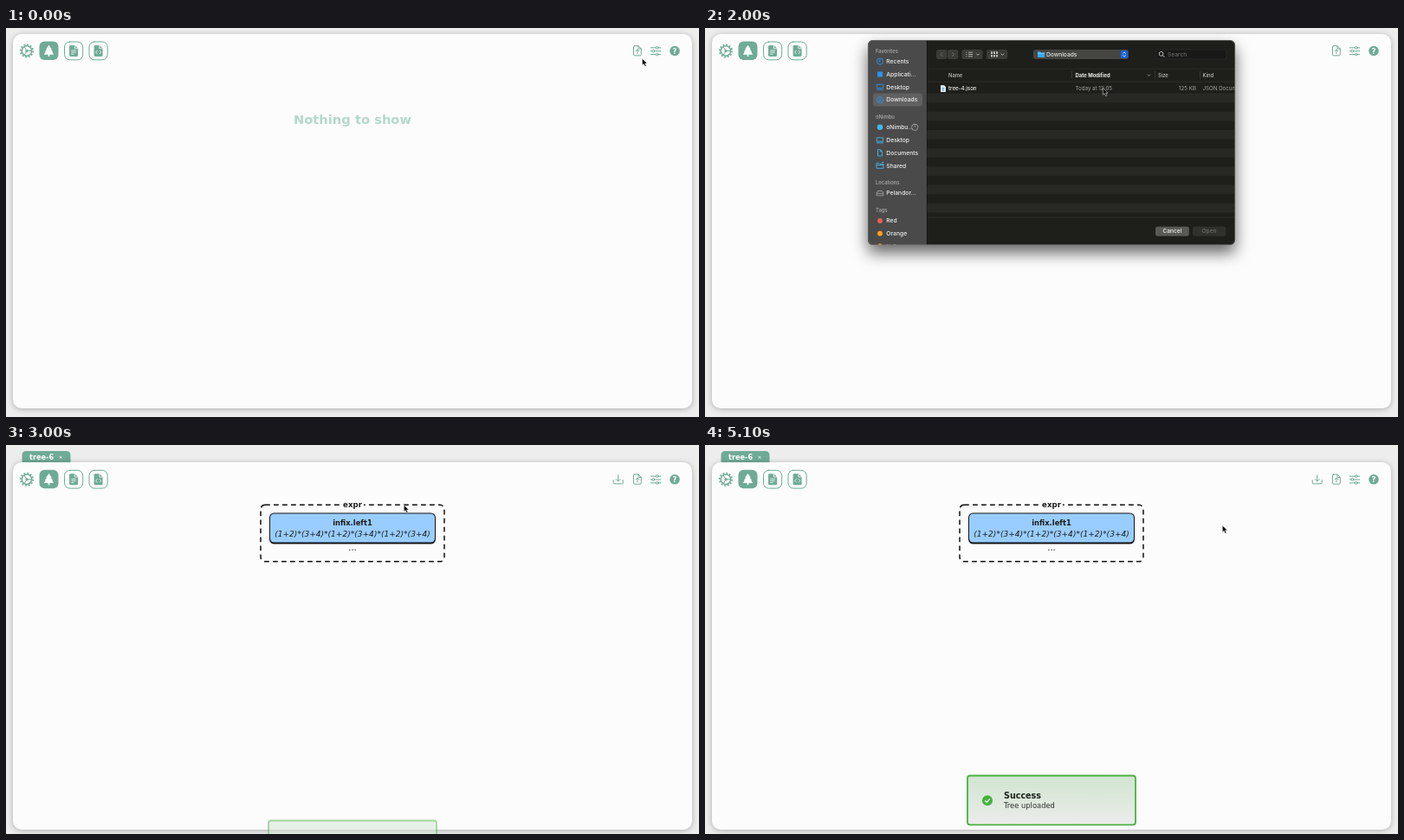
An HTML page that plays this animation: 800 by 450 pixels, repeating every 5200 ms.

```html
<!DOCTYPE html>
<html lang="en">
<head>
<meta charset="utf-8">
<title>Tree upload</title>
<style>
  html, body { margin: 0; width: 100%; height: 100%; overflow: hidden; background: #ededed; }
  svg { display: block; width: 100%; height: 100%; }
  text { white-space: pre; }
  .app { font-family: "DejaVu Sans", Verdana, sans-serif; }
  .mac { font-family: Inter, "Open Sans", sans-serif; }
  .b { font-weight: 700; }
  .line { fill: none; stroke: #6fab97; stroke-width: 1; stroke-linecap: round; stroke-linejoin: round; }
  .teal { fill: #6fab97; }
  #card { filter: drop-shadow(0 1px 3px rgba(0,0,0,.28)); }
  #dialog { filter: drop-shadow(0 9px 9px rgba(0,0,0,.6)); }
</style>
</head>
<body>
<svg viewBox="0 0 800 450">
  <defs>
    <clipPath id="panel"><rect x="188" y="14" width="424" height="237" rx="6"/></clipPath>
    <linearGradient id="mint" x1="0" y1="0" x2="0" y2="1">
      <stop offset="0" stop-color="#d0e5cf"/><stop offset="1" stop-color="#ececeb"/>
    </linearGradient>
  </defs>
  <rect width="800" height="450" fill="#ededed"/>

  <g class="app">
    <g id="tab">
      <path class="teal" d="M18.500 20V12q0-5 5-5h46q5 0 5 5v8z"/>
      <text class="b" x="27" y="17" font-size="8.2" fill="#fff">tree-6</text>
      <path d="M61.500 12.700l3.200 3.200m0-3.200l-3.200 3.200" stroke="#fff" stroke-width=".7"/>
    </g>
    <rect id="card" x="8" width="784" rx="10" fill="#fcfcfc"/>
    <text id="empty" class="b" x="400" y="111.300" font-size="14.700" text-anchor="middle" fill="#b3d8cc">Nothing to show</text>

    <g id="tools">
      <g class="line">
        <circle cx="24" cy="26.500" r="5.700" stroke-width="1.500"/>
        <circle id="teeth" cx="24" cy="26.500" r="7.200" stroke-width="1.700" stroke-linecap="butt"/>
        <path d="M24 26.500h5.500M24 26.500l-2.800-4.800M24 26.500l-2.800 4.800"/>
        <circle cx="24" cy="26.500" r="1.300"/>
      </g>
      <rect class="teal" x="38.500" y="15.500" width="22" height="21.500" rx="6"/>
      <path d="M49.500 19.800l3.300 4.600h-1l2.400 3.400h-1l2 3h-4.900v2.200h-1.600v-2.200h-4.900l2-3h-1l2.400-3.400h-1z" fill="#fff"/>
      <g class="line">
        <rect x="67.500" y="16" width="21.200" height="20.800" rx="6"/>
        <rect x="96" y="16" width="21.200" height="20.800" rx="6"/>
      </g>
      <g class="teal">
        <path id="doc" d="M74.500 19.900h4.900l3.700 3.700v8q0 1.400-1.400 1.400h-7.200q-1.400 0-1.400-1.400v-10.300q0-1.400 1.400-1.400z"/>
        <use href="#doc" x="28.500"/>
      </g>
      <g fill="none" stroke="#fff" stroke-width=".8">
        <path d="M79.400 20v3.700h3.600M75.300 26h5.500M75.300 28.100h5.500M75.300 30.200h3.200"/>
        <path d="M107.900 20v3.700h3.600M105.500 26l-1.900 2 1.900 2M107.900 26l1.900 2-1.900 2"/>
      </g>
      <g class="line">
        <path d="M725.700 20.700h4.300l3.300 3.300v6.700q0 1.200-1.200 1.200h-6.400q-1.200 0-1.200-1.200v-8.800q0-1.200 1.200-1.200zM730 20.900v3.200h3.200M728.900 29.300v-4.400m-1.700 1.700l1.700-1.700 1.700 1.700"/>
        <path d="M744.300 22.800h6m2.800 0h2.600M744.300 26.700h1.600m2.800 0h7M744.300 30.600h6m2.800 0h2.600"/>
        <circle cx="751.700" cy="22.800" r="1.350"/><circle cx="747.300" cy="26.700" r="1.350"/><circle cx="751.700" cy="30.600" r="1.350"/>
        <path id="save" d="M701.200 27.300v3.200q0 1 1 1h9q1 0 1-1v-3.200M706.700 21.500v7.200m-2.500-2.500l2.500 2.500 2.500-2.500"/>
      </g>
      <circle class="teal" cx="772" cy="26.500" r="5.800"/>
      <text class="b" x="772" y="29.700" font-size="8.500" text-anchor="middle" fill="#fff">?</text>
    </g>

    <g id="tree" text-anchor="middle" fill="#1d1d1d">
      <rect x="294" y="69.300" width="212" height="65.500" rx="5" fill="none" stroke="#111" stroke-width="1.500" stroke-dasharray="5.800 4.200"/>
      <rect x="387" y="64" width="26" height="10" fill="#fcfcfc"/>
      <text class="b" x="400" y="72" font-size="8.600">expr</text>
      <rect x="304" y="78.500" width="192" height="36" rx="5.500" fill="#111"/>
      <rect x="305" y="79.500" width="190" height="33" rx="4.500" fill="#99cdff"/>
      <text class="b" x="400" y="93" font-size="8.400">infix.left1</text>
      <text x="400" y="105.800" font-size="9.050" font-style="italic">(1+2)*(3+4)*(1+2)*(3+4)*(1+2)*(3+4)</text>
      <text x="400" y="122" font-size="10">...</text>
    </g>

    <g id="toast">
      <rect x="303" y="382.500" width="194" height="56.800" rx="3" fill="url(#mint)" stroke="#4bb143" stroke-width="1.800"/>
      <circle cx="326" cy="411.200" r="6" fill="#45b13e"/>
      <path d="M323.200 411.300l2 2 3.700-3.900" fill="none" stroke="#fff" stroke-width="1.200"/>
      <text class="b" x="345" y="409" font-size="9.600" fill="#1d2420">Success</text>
      <text x="345" y="420" font-size="8.350" fill="#2b302c">Tree uploaded</text>
    </g>
  </g>

  <g id="dialog" class="mac">
    <g clip-path="url(#panel)">
      <rect x="188" y="14" width="424" height="237" fill="#1e1e1b"/>
      <rect x="188" y="14" width="68" height="237" fill="#4a4a4a"/>
      <path d="M256.300 14v237" stroke="#111" stroke-width=".6"/>
      <g id="stripes" fill="#282825"></g>
      <path d="M257 47.300h355M257 62.200h355M257 219h355" stroke="#343431" stroke-width=".7"/>
      <path d="M423.500 50v9M519.500 50v9M571.500 50v9" stroke="#42423f" stroke-width=".7"/>
      <rect id="pick" x="256.500" y="65" width="356" height="10.600" fill="#0a50d2"/>

      <g fill="#3b3b38">
        <rect x="267" y="25" width="12.300" height="11" rx="2.500"/>
        <rect x="280" y="25" width="12.300" height="11" rx="2.500"/>
        <rect x="296.300" y="25" width="24.200" height="11" rx="2.500"/>
        <rect x="325" y="25" width="24.200" height="11" rx="2.500"/>
        <rect x="379" y="25" width="110" height="11" rx="2.700" fill="#454542"/>
      </g>
      <g fill="none" stroke="#777773" stroke-width=".9">
        <path d="M274.200 28.200l-2.200 2.300 2.200 2.300M285.200 28.200l2.200 2.300-2.200 2.300"/>
        <g stroke="#bcbcb9">
          <path d="M304 28.200h5M304 30.500h5M304 32.800h5M301.300 28.200h1M301.300 30.500h1M301.300 32.800h1"/>
          <path d="M313.300 29.700l1.700 1.700 1.700-1.700M341.700 29.700l1.700 1.700 1.700-1.700"/>
          <path d="M330 28.600h8M330 32.200h8" stroke-width="2.600" stroke-dasharray="2 1"/>
          <path d="M510.800 53.700l1.700 1.700 1.700-1.700" stroke-width=".7"/>
        </g>
      </g>
      <path d="M384 27.300h3l1 1h4.200v5.700h-8.200z" fill="#38aaf0"/>
      <path d="M384 29.500h8.200" stroke="#82d2fb" stroke-width=".7"/>
      <rect x="479.600" y="26" width="8.600" height="9" rx="2" fill="#1762dc"/>
      <path d="M482.200 29.600l1.700-1.800 1.700 1.800M482.200 31.400l1.700 1.800 1.700-1.800" fill="none" stroke="#fff" stroke-width=".8"/>
      <rect x="520.300" y="25" width="81.500" height="11" rx="2.500" fill="#191917" stroke="#32322f" stroke-width=".6"/>
      <g fill="none" stroke="#d0d0cd" stroke-width=".9"><circle cx="526.600" cy="29.900" r="2.400"/><path d="M528.400 31.700l2.100 2.200"/></g>

      <path d="M272 66.200h4l1.900 1.900v6h-5.900z" fill="#f1f5f8"/>
      <path d="M273.300 69.200h3M273.300 70.700h3M273.300 72.200h3" stroke="#3d8ce0" stroke-width=".8"/>
      <rect x="520" y="229.700" width="38.800" height="11" rx="2.500" fill="#595956"/>
      <rect id="openBtn" x="563" y="229.700" width="38.200" height="11" rx="2.500"/>
      <rect x="194" y="75.500" width="57" height="15" rx="3" fill="#616161"/>
      <g id="labels"></g>

      <g fill="none" stroke="#2d93ee" stroke-width=".9">
        <circle cx="202" cy="38.600" r="3.600"/><path d="M202 36.300v2.500h-1.800"/>
        <rect x="199" y="50.500" width="6" height="6" fill="#2d93ee" stroke="none"/>
        <path d="M198.300 65.300h7.400v4.300h-7.400zM198 71.300h8"/>
        <circle cx="202" cy="83.200" r="3.600"/><path d="M202 81v4m-1.600-1.500l1.600 1.600 1.600-1.600"/>
        <g stroke="#45b7ec">
          <circle cx="202" cy="114.800" r="3.300" fill="#45b7ec" stroke="none"/>
          <path d="M198.300 126.900h7.400v4.300h-7.400zM198 132.900h8"/>
          <path d="M199.500 140.700h3l2 2v5.300h-5zM202.400 140.900v2h2"/>
          <path d="M198 156.300h3l1 1h4v5h-8zM198 158.500h8M204 155.500h2.400"/>
        </g>
        <g stroke="#a0a0a0">
          <path d="M199.400 188.500h5.200l1.300 2.800v2.500h-7.800v-2.500zM198.200 191.300h7.600"/>
          <circle cx="242.200" cy="114.800" r="3.700"/><path d="M242.200 111.300v3.500"/>
        </g>
      </g>
      <circle cx="202" cy="223" r="2.900" fill="#f25c4c"/>
      <circle cx="202" cy="237.700" r="2.900" fill="#f9a51a"/>
      <circle cx="202" cy="252.500" r="2.900" fill="#f8d130"/>
    </g>
    <rect x="188.400" y="14.400" width="423.200" height="236.200" rx="5.700" fill="none" stroke="#6a6a68" stroke-width=".7"/>
  </g>

  <path id="cursor" d="M0 0v7.900l1.800-1.600 1.400 3 1.500-.7-1.400-2.800h2.500z" fill="#080808" stroke="#fff" stroke-width=".5"/>
</svg>

<script>
const LOOP = 5200, STEP = 100;
const NS = "http://www.w3.org/2000/svg";
const $ = id => document.getElementById(id);

function add(parent, tag, attrs, content = "") {
  const el = document.createElementNS(NS, tag);
  for (const key in attrs) el.setAttribute(key, attrs[key]);
  el.textContent = content;
  parent.appendChild(el);
  return el;
}

function label(content, x, mid, size = 6.2, fill = "#e6e6e4", weight = 500, anchor = "start") {
  return add($("labels"), "text", {
    x, y: mid + size * .36, "font-size": size, fill, "font-weight": weight, "text-anchor": anchor
  }, content);
}

// Static parts of the file panel
for (let i = 1; i < 14; i += 2)
  add($("stripes"), "rect", { x: 256.5, y: 65 + i * 10.6, width: 356, height: 10.6 });

[["Favorites", 27], ["oNimbu", 103], ["Locations", 179.3], ["Tags", 211]]
  .forEach(([name, y]) => label(name, 197, y, 5.8, "#a2a2a2", 600));
[["Recents", 38.6], ["Applicati...", 53.4], ["Desktop", 68.2], ["Downloads", 83],
 ["oNimbu...", 114.8], ["Desktop", 129.6], ["Documents", 144.4], ["Shared", 159.2],
 ["Pelandor...", 191], ["Red", 222.8], ["Orange", 237.6], ["Yellow", 252.4]]
  .forEach(([name, y]) => label(name, 209.3, y, 6.75, "#f0f0f0"));

label("Downloads", 394, 30.4, 6.65);
label("Search", 534, 30.4, 6.7, "#777774", 400);
label("Name", 281, 54.5, 5.8, "#c4c4c1");
label("Date Modified", 427.5, 54.5, 5.9, "#f0f0ee", 700);
label("Size", 523, 54.5, 5.8, "#c4c4c1");
label("Kind", 574.5, 54.5, 5.8, "#c4c4c1");
label("tree-4.json", 281, 70.2, 6.2, "#f0f0ee");
const details = [
  label("Today at 12:05", 427.5, 70.2, 6.2, "", 400),
  label("125 KB", 567, 70.2, 6.2, "", 400, "end"),
  label("JSON Document", 574.5, 70.2, 6.2, "", 400)
];
label("Cancel", 539.4, 235.1, 6.6, "#f4f4f2", 500, "middle");
const openText = label("Open", 582, 235.1, 6.6, "", 500, "middle");

const tooth = 2 * Math.PI * 7.2 / 24;
$("teeth").setAttribute("stroke-dasharray", `${tooth} ${tooth}`);

// Interpolated value of a list of [time, value] keys
function track(t, keys, ease = p => p) {
  if (t <= keys[0][0]) return keys[0][1];
  for (let i = 1; i < keys.length; i++) {
    const [t0, a] = keys[i - 1], [t1, b] = keys[i];
    if (t < t1) return a + (b - a) * ease((t - t0) / (t1 - t0));
  }
  return keys[keys.length - 1][1];
}
const smooth = p => p * p * (3 - 2 * p);
const easeOut = p => 1 - (1 - p) ** 3;

const show = (id, on) => $(id).style.display = on ? "" : "none";
const shift = (id, x, y) => $(id).setAttribute("transform", `translate(${x} ${y})`);

const cursorX = [[0, 734.4], [300, 729.5], [1000, 729.5], [2000, 459.3], [3000, 459.3], [3500, 597.3]];
const cursorY = [[0, 35.2], [300, 29.4], [1000, 29.4], [2000, 69.3], [3000, 69.3], [3500, 93]];
const zoom = [[500, .46], [600, .55], [800, .764], [900, .93], [1000, 1]];
const fade = [[500, 0], [600, .22], [800, .79], [900, .96], [1000, 1], [2800, 1], [2900, .35], [3000, 0]];

function draw(now) {
  const t = Math.floor(now % LOOP / STEP) * STEP;
  const loaded = t >= 3000, picked = t >= 2400;

  $("card").setAttribute("y", loaded ? 20 : 7);
  $("card").setAttribute("height", loaded ? 425 : 433);
  shift("tools", 0, loaded ? 13.3 : 0);
  for (const id of ["tab", "save", "tree", "toast"]) show(id, loaded);
  show("empty", !loaded);

  const alpha = track(t, fade);
  show("dialog", alpha > 0);
  $("dialog").setAttribute("opacity", alpha);
  $("dialog").setAttribute("transform",
    `translate(400 132.5) scale(${track(t, zoom)}) translate(-400 -132.5)`);
  show("pick", picked);
  $("openBtn").setAttribute("fill", picked ? "#1761d6" : "#30302d");
  openText.setAttribute("fill", picked ? "#fff" : "#6b6b68");
  details.forEach(el => el.setAttribute("fill", picked ? "#d5e2fa" : "#a4a4a1"));

  shift("toast", 0, track(t, [[3000, 52], [3400, 0]], easeOut));
  $("toast").setAttribute("opacity", track(t, [[3000, .5], [3400, 1]], easeOut));
  shift("cursor", track(t, cursorX, smooth), track(t, cursorY, smooth));
}

const start = performance.now();
function tick() {
  draw(performance.now() - start);
  requestAnimationFrame(tick);
}
tick();
</script>
</body>
</html>
```
